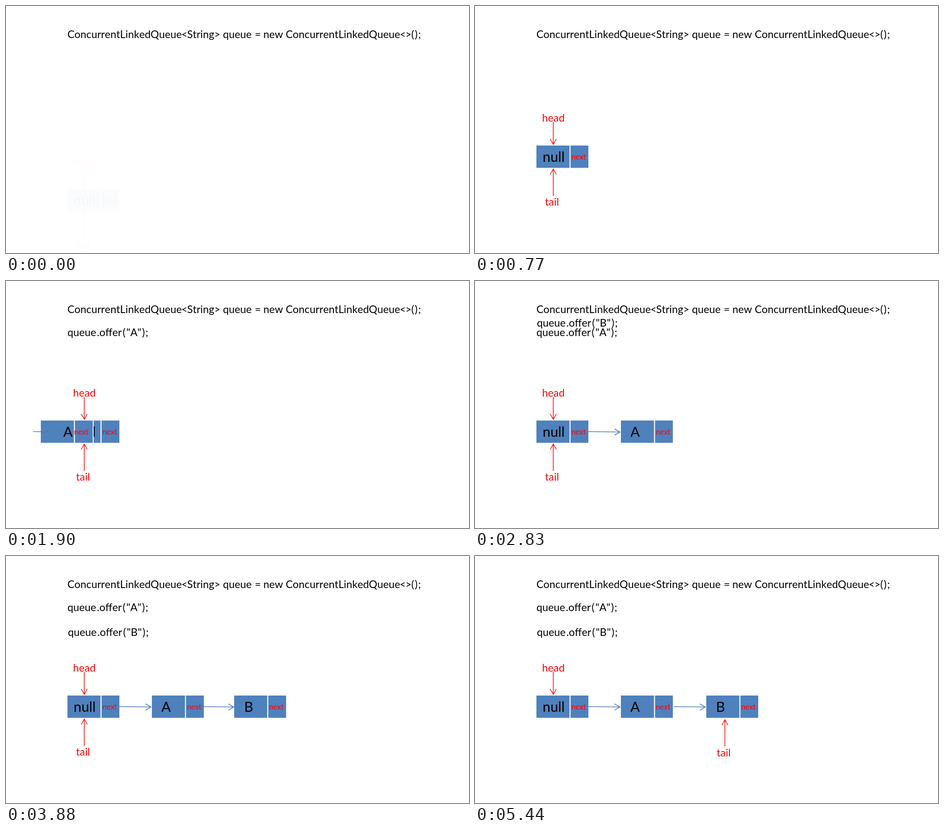
An HTML page that plays this animation: 1025 px wide and 547 px high, repeating every 6150 ms.

```html
<!DOCTYPE html>
<html lang="en">
<head>
<meta charset="utf-8">
<title>Queue offer</title>
<style>
  html, body { margin: 0; width: 100%; height: 100%; overflow: hidden; background: #fff; }
  svg { display: block; width: 1025px; height: 547px; }
  text { font-family: Lato, "Open Sans", sans-serif; font-kerning: none; white-space: pre; }
  .code, .label { font-size: 23.3px; }
  .value { font-size: 30.8px; text-anchor: middle; }
  .next { font-size: 16.5px; text-anchor: middle; }
  .label, .next { fill: #f00; }
  .cell { fill: #4f81bd; stroke: #fff; stroke-width: 2; }
  .arrow { fill: none; stroke-width: 1.5; }
  .link { stroke: #4a7ebb; }
  .pointer { stroke: #f00; }
</style>
</head>
<body>
<svg id="stage" viewBox="0 0 1025 547"></svg>
<script>
const LOOP = 6150;
const stage = document.getElementById("stage");

function add(parent, tag, attrs = {}, content = "") {
  const el = document.createElementNS("http://www.w3.org/2000/svg", tag);
  for (const key in attrs) el.setAttribute(key, attrs[key]);
  el.textContent = content;
  return parent.appendChild(el);
}
const group = (parent = stage) => add(parent, "g");
const text = (parent, cls, x, y, content) => add(parent, "text", { class: cls, x, y }, content);
const arrow = (parent, cls, d) => add(parent, "path", { class: "arrow " + cls, d });

function codeLine(y, tokens) {
  const g = group();
  for (const [x, word] of tokens) text(g, "code", x, y, word);
  return g;
}

const className = x => [[x, "Concurrent"], [x + 116.6, "Linked"], [x + 184, "Queue"]];

function offerLine(x, y, letter) {
  return codeLine(y, [[x, "queue"], [x + 65.3, ".offer"], [x + 122.3, "("], [x + 130.4, '"'],
    [x + 139.2, letter], [x + 155, '"'], [x + 165.3, ")"], [x + 172.7, ";"]]);
}

// Box, value and "next" label are separate layers, because each travels its own distance.
function makeNode(x, value, valueX) {
  const box = group(), letter = group(), next = group();
  add(box, "rect", { class: "cell", x, y: 308, width: 75.5, height: 51.4 });
  add(box, "rect", { class: "cell", x: x + 75.5, y: 308, width: 41.5, height: 51.4 });
  text(letter, "value", valueX, 345, value);
  text(next, "next", x + 94.5, 339.5, "next");
  return { x, box, letter, next };
}

function makeLinkedNode(x, value) {
  const node = makeNode(x, value, x + 32.5);
  node.link = group();
  arrow(node.link, "link", `M${x - 71} 333.5L${x - 1} 334.5M${x - 13} 327.5L${x - 1} 334.5L${x - 13} 341.5`);
  return node;
}

function makeTail(dx, dy) {
  const outer = add(stage, "g", { transform: `translate(${dx} ${dy})` });
  const g = group(outer);
  arrow(g, "pointer", "M173.3 420.5V361M166.5 373L173.3 361L180 373");
  text(g, "label", 155, 442, "tail");
  return g;
}

codeLine(71, [...className(136), [388.2, "<"], [400.9, "String"], [461.1, ">"], [480.2, "queue"],
  [550.7, "="], [569.7, "new"], ...className(619.3), [871.5, "<"], [884.2, ">"],
  [897.2, "("], [905, ")"], [912.4, ";"]]);

const first = makeNode(135, "null", 174.2);
const head = group();
arrow(head, "pointer", "M173.3 257V306.5M166.5 294.5L173.3 306.5L180 294.5");
text(head, "label", 148.5, 256, "head");
const tailOld = makeTail(0, 0);
const offerA = offerLine(136, 121.5, "A");
const nodeA = makeLinkedNode(322, "A");
const offerB = offerLine(137, 176.5, "B");
const nodeB = makeLinkedNode(511, "B");
const tailNew = makeTail(380, 1.5);

// Linear progress that advances in held steps.
function progress(t, start, step, from, rate) {
  if (t < start) return null;
  return Math.min(1, from + rate * Math.floor((t - start) / step));
}

function show(el, visible) {
  el.setAttribute("visibility", visible ? "visible" : "hidden");
}
function move(el, x, y) {
  el.setAttribute("transform", `translate(${x.toFixed(2)} ${y.toFixed(2)})`);
}

// Fly in from outside the stage; edge is the far side of the part at rest.
function flyLeft(el, p, edge) {
  show(el, p !== null);
  move(el, -(1 - p) * edge, 0);
}
function flyTop(el, p, edge) {
  show(el, p !== null);
  move(el, 0, -(1 - p) * edge);
}

function flyNode(node, p) {
  const right = node.x + 116;
  flyLeft(node.box, p, right);
  flyLeft(node.letter, p, right - 51);
  flyLeft(node.next, p, right + 7);
  flyLeft(node.link, p, node.x + 18);
}

function render(t) {
  const rise = progress(t, 0, 77, 0.02, 0.098);
  for (const el of [first.box, first.letter, first.next, head, tailOld]) {
    move(el, 0, 98 * (1 - rise));
    el.setAttribute("opacity", rise);
  }
  flyTop(offerA, progress(t, 1020, 80, 0.1, 0.1286), 133);
  flyNode(nodeA, progress(t, 1660, 80, 0.119, 0.1065));
  flyTop(offerB, progress(t, 2510, 80, 0.097, 0.125), 188);
  flyNode(nodeB, progress(t, 3160, 80, 0.0125, 0.1085));
  show(tailOld, t < 4660);
  flyLeft(tailNew, progress(t, 4660, 78, -0.055, 0.1065), 567);
}

const begin = performance.now();
function frame() {
  render((performance.now() - begin) % LOOP);
  requestAnimationFrame(frame);
}
render(0);
requestAnimationFrame(frame);
</script>
</body>
</html>
```
